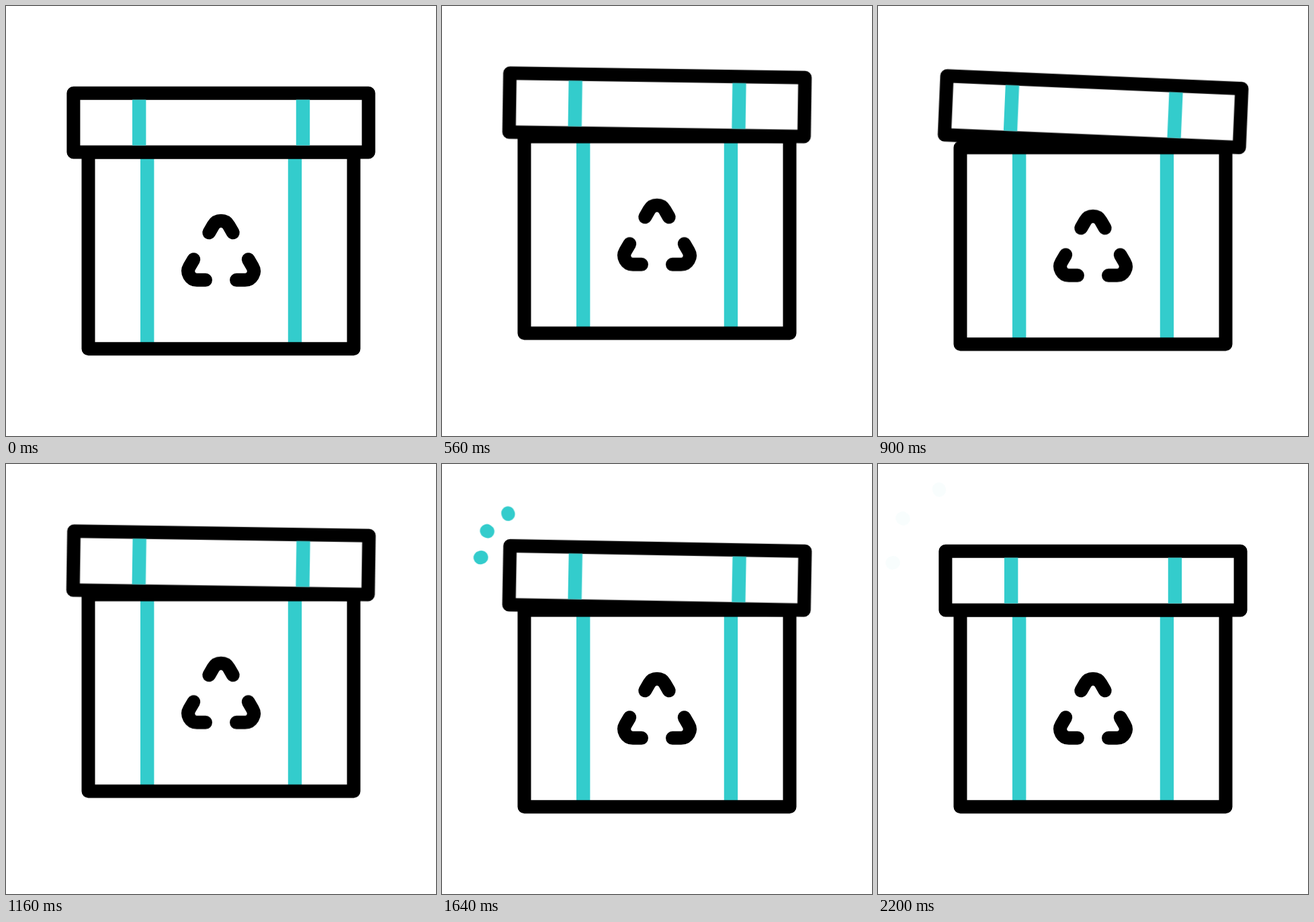
Write an HTML page that moves like this. It is 640 px wide and 640 px high and loops after 2400 ms.

```html
<!DOCTYPE html>
<html lang="en">
<head>
<meta charset="utf-8">
<title>Hopping box</title>
<style>
  html, body { margin: 0; width: 100%; height: 100%; overflow: hidden; background: #fff; }
  svg { display: block; width: 100vw; height: 100vh; }
  path, rect { fill: none; stroke: #000; stroke-width: 20; stroke-linecap: round; stroke-linejoin: round; }
  .lid rect { fill: #fff; }
  .strap { stroke: #3cc; stroke-width: 20.4; stroke-linecap: butt; }
  .spark { stroke: #3cc; opacity: 0; animation: fly 2400ms infinite, fade 2400ms infinite; }

  .box, .lid {
    animation: hop 2400ms cubic-bezier(.333, 0, .667, 1) infinite;
  }
  .lid { animation-name: flap; transform-origin: 540px 173.5px; }

  @keyframes hop {
    0%, 8.333%, 33.333%, 58.333%, 100% { transform: translateY(0); }
    20.833%, 45.833% { transform: translateY(-26px); }
  }

  /* The lid swings open on landing and settles with one small bounce. */
  @keyframes flap {
    0%, 20.833%, 40%, 45.833%, 65%, 81.667%, 100% { transform: rotate(0deg); }
    33.333%, 58.333% { transform: rotate(8deg); }
    73.333% { transform: rotate(2.9deg); }
  }

  @keyframes fly {
    0%, 62.5% {
      transform: translate(var(--x), var(--y));
      animation-timing-function: cubic-bezier(.333, .667, .667, 1);
    }
    81.75%, 100% { transform: translate(0, 0); }
  }

  @keyframes fade {
    0%, 62.49% { opacity: 0; animation-timing-function: step-end; }
    62.5% { opacity: 1; }
    75% { opacity: 1; animation-timing-function: cubic-bezier(.333, 0, .667, 1); }
    91.667%, 100% { opacity: .03; }
  }
</style>
</head>
<body>
<svg viewBox="0 0 640 640">
  <defs>
    <path id="arm" d="M302.3 337.3L308.5 326.5C313.5 317.5 326.5 317.5 331.5 326.5L337.7 337.3"/>
  </defs>

  <path class="spark" style="--x: 74px; --y: -16.4px" d="M21.2 147.2l1.7-.4"/>
  <path class="spark" style="--x: 62.8px; --y: 39.1px" d="M36.2 80.6l1.5 .9"/>
  <path class="spark" style="--x: 15.4px; --y: 74px" d="M90.8 37.2l.4 1.7"/>

  <g class="box">
    <path class="strap" d="M210.2 218V510M430 218V510"/>
    <rect x="122.5" y="217.6" width="395" height="292.7"/>
    <use href="#arm"/>
    <use href="#arm" transform="rotate(120 320 374.1)"/>
    <use href="#arm" transform="rotate(240 320 374.1)"/>
    <g class="lid">
      <rect x="100.4" y="129.7" width="439.2" height="87.8"/>
      <path class="strap" d="M198.2 139.5V207.6M442 139.5V207.6"/>
    </g>
  </g>
</svg>
</body>
</html>
```
